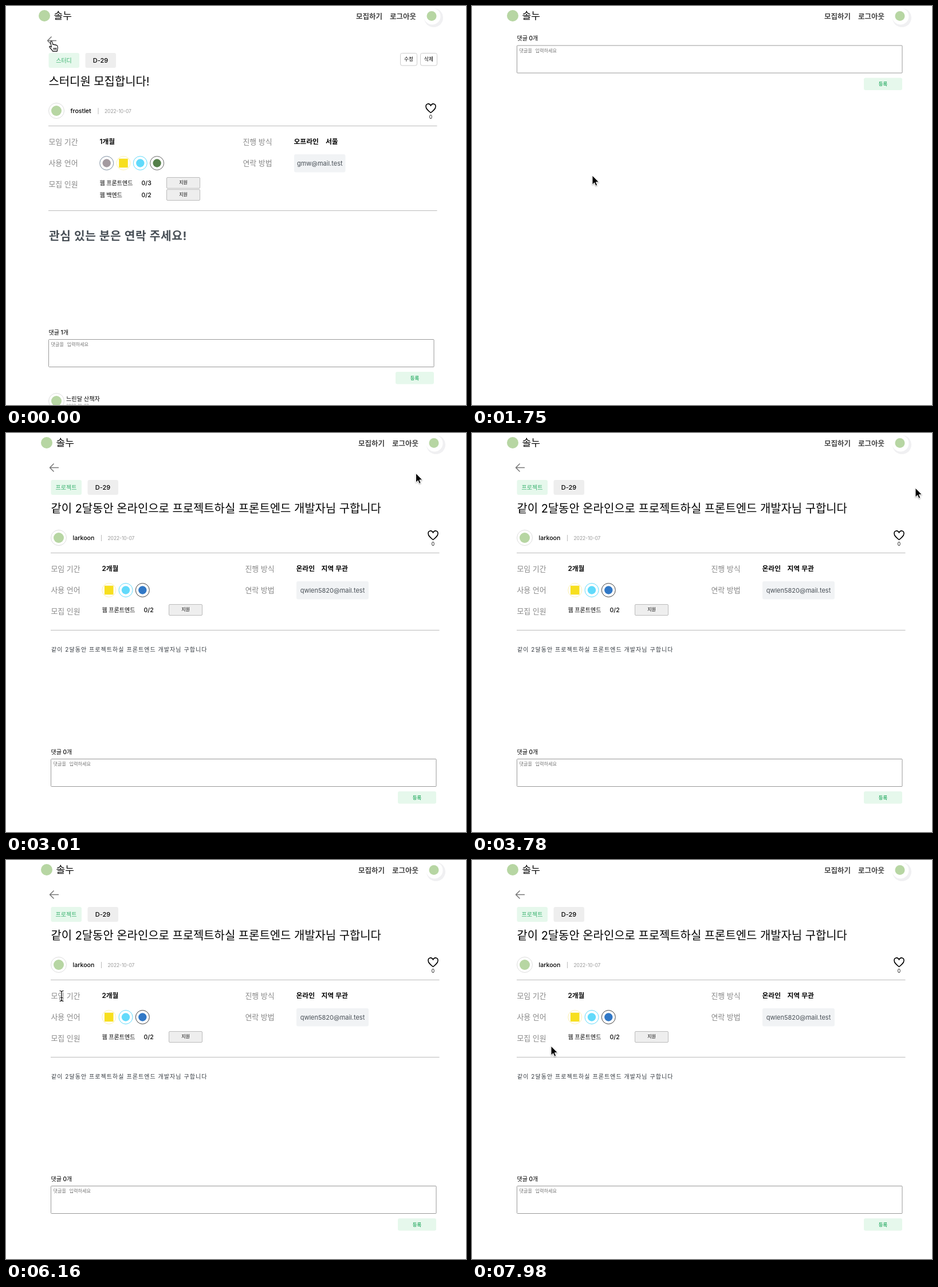
An HTML page for the animation above (8000 ms loop, 803 by 697 pixels).

```html
<!DOCTYPE html>
<html lang="ko">
<head>
<meta charset="utf-8">
<style>
html, body { margin: 0; width: 100%; height: 100%; overflow: hidden; background: #fff; }
svg { display: block; width: 803px; height: 697px; }
text { font-family: Inter, 'Noto Sans CJK KR', 'Noto Sans CJK JP', sans-serif; white-space: pre; }
.soft { filter: drop-shadow(0 1px 3px #0001); }
</style>
</head>
<body>
<svg id="stage" viewBox="0 0 803 697"></svg>
<script>
const GREEN = '#3cb371', MINT = '#e6f8ec', LEAF = '#b7d6a3';

// y is the visual middle of the text line
const text = (x, y, s, size, fill = '#000', weight = 400, anchor = 'start', more = '') =>
  `<text x="${x}" y="${y + size * .37}" font-size="${size}" fill="${fill}" font-weight="${weight}" text-anchor="${anchor}" ${more}>${s}</text>`;
const mid = (x, y, s, size, fill, weight) => text(x, y, s, size, fill, weight, 'middle');
const rect = (x, y, w, h, fill, rx = 0, stroke = 'none', more = '') =>
  `<rect x="${x}" y="${y}" width="${w}" height="${h}" rx="${rx}" fill="${fill}" stroke="${stroke}" ${more}/>`;
const dot = (x, y, r, fill, stroke = 'none') => `<circle cx="${x}" cy="${y}" r="${r}" fill="${fill}" stroke="${stroke}"/>`;
const line = (d, stroke, w = 1) => `<path d="${d}" fill="none" stroke="${stroke}" stroke-width="${w}" stroke-linejoin="round"/>`;
const group = (dx, body, id = '') => `<g ${id && `id="${id}"`} transform="translate(${dx})">${body}</g>`;
const heart = (x, y, k, stroke, w) =>
  `<path transform="translate(${x} ${y}) scale(${k})" d="M0 8C-5 4-8.5 1-8.5-3C-8.5-8-2.5-9.500 0-4.500C2.500-9.500 8.500-8 8.500-3C8.500 1 5 4 0 8Z" fill="none" stroke="${stroke}" stroke-width="${w / k}"/>`;

// fill, ring, shape
const kinds = {
  js: ['#f7df1e', '#fbf0b0', 'square'], ts: ['#3178c6', '#444'], react: ['#61dafb', '#61dafb'],
  vue: ['#41b883', '#666'], svelte: ['#ff5a2a', '#ff8a66'], next: ['#000', '#222'], java: ['#a39aa0', '#7d8ea0'],
  spring: ['#6db33f', '#8cc46a'], node: ['#55804a', '#666'], nest: ['#e0234e', '#ee8899'], go: ['#00add8', '#55bbdd'],
  kotlin: ['#a94fe8', '#777', 'square'], express: ['#555', '#333'], mysql: ['#4a7fa5', '#557'],
  mongo: ['#4faa41', '#777'], python: ['#3776ab', '#777'], php: ['#777bb4', '#777'], graphql: ['#e10098', '#666'],
  flutter: ['#45c0f5', '#45c0f5'], swift: ['#f05138', '#f7c9b0', 'square'], native: ['#61dafb', '#9ee8fc'],
  unity: ['#222', '#222'], aws: ['#3a4454', '#333'], docker: ['#2496ed', '#7cc4f5']
};
const icon = (x, y, r, name) => {
  const [fill, ring, shape] = kinds[name], side = r * 1.3;
  return dot(x, y, r, '#fff', ring) +
    (shape ? rect(x - side / 2, y - side / 2, side, side, fill) : dot(x, y, r * .6, fill));
};

const header = () => dot(67, 17, 10, LEAF) + text(83.500, 17, '솔누', 17) +
  text(611, 18, '모집하기', 12.5, '#444', 600) + text(670, 18, '로그아웃', 12.5, '#444', 600) +
  dot(746.5, 20.5, 16.5, '#f0f0f2') + dot(744, 18, 14.5, '#fff') + dot(743, 17.5, 8.5, LEAF);

const comments = (y, n) => text(74.5, y, `댓글 ${n}개`, 10, '#000', 500) +
  rect(74.5, y + 12.5, 672.5, 48, '#fff', 1, '#999') +
  text(78.5, y + 21, '댓글을 입력하세요', 8.2, '#777', 400, 'start', 'word-spacing="3"') +
  rect(680, y + 69, 67, 21.5, MINT, 3) + mid(713.5, y + 79.5, '등록', 8.3, GREEN, 600);

const detail = p => line('M88 60.500H73M79.500 53.500L72.500 60.500L79.500 67.500', '#777', 1.5) +
  rect(74.5, 82, 53.5, 26, MINT, 3) + mid(101, 95, p.tag, 10, GREEN, 500) +
  rect(138.5, 82, 53.5, 26, '#eee', 3) + mid(165, 95, 'D-29', 11, '#000', 500) +
  text(74.5, 131.5, p.title, 19.9) +
  dot(88, 183, 13.5, '#fff', '#ddd') + dot(88, 183, 9, LEAF) +
  text(112.5, 183.5, p.name, 10.6, '#000', 500) + line(`M${p.bar} 178V189`, '#bbb') +
  text(p.bar + 11, 183.5, '2022-10-07', 8.4, '#999') +
  heart(741.5, 178.5, 1, '#000', 1.6) + mid(741.5, 194, '0', 8.5) +
  line('M74 209.500H752.500', '#bbb') +
  ['모임 기간', '사용 언어', '모집 인원'].map((s, i) => text(74.5, 237 + 37.300 * i, s, 12.9, '#888')).join('') +
  text(163.5, 237, p.span, 11.7, '#000', 600) +
  text(413.5, 237, '진행 방식', 12.9, '#888') + text(413.5, 274.5, '연락 방법', 12.9, '#888') +
  text(502.5, 237, p.mode, 11.8, '#000', 600) + text(p.placeX, 237, p.place, 11.8, '#000', 600) +
  rect(503, 259, p.mailW, 31.5, '#f1f3f5', 3) + mid(503 + p.mailW / 2, 274.5, p.mail, 11, '#495057') +
  p.icons.map((n, i) => icon(175.7 + 29.3 * i, 274.5, 12, n)).join('') +
  p.roles.map(([role, n], i) => {
    const y = 309 + 21 * i;
    return text(163.5, y, role, 10, '#000', 500) + text(236.5, y, n, 10.5, '#000', 500) +
      rect(280.5, y - 9.5, 58, 19, '#eee', 1.5, '#bbb') + mid(309.5, y - .5, '지원', 8, '#000', 500);
  }).join('') +
  line(`M74 ${p.end}H752.500`, '#bbb') + p.body;

const small = (x, s) => rect(x, 688, 29.500, 22, '#fff', 3, '#ccc');
const button = (x, s) => rect(x, 82.5, 29, 21.5, '#fff', 3, '#ccc') + mid(x + 14.5, 93, s, 8.6, '#000', 500);

const first = header() + detail({
  tag: '스터디', title: '스터디원 모집합니다!', name: 'frostlet', bar: 161, span: '1개월', mode: '오프라인',
  place: '서울', placeX: 558, mail: 'gmw@mail.test', mailW: 89.5, icons: ['java', 'js', 'react', 'node'],
  roles: [['웹 프론트엔드', '0/3'], ['웹 백엔드', '0/2']], end: 357.5,
  body: text(75, 401, '관심 있는 분은 연락 주세요!', 20.3, '#495057', 700, 'start', 'letter-spacing=".6"')
}) + button(688.5, '수정') + button(723.5, '삭제') + comments(570, 1) +
  dot(88, 690, 13.5, '#fff', '#ddd') + dot(88, 690, 9, LEAF) +
  text(105, 686.5, '느린달 산책자', 10.2, '#000', 500) + text(105, 698, '2022-10-07', 7, '#999');

const second = detail({
  tag: '프로젝트', title: '같이 2달동안 온라인으로 프로젝트하실 프론트엔드 개발자님 구합니다', name: 'larkoon', bar: 162.5,
  span: '2개월', mode: '온라인', place: '지역 무관', placeX: 546.5, mail: 'qwlen5820@mail.test', mailW: 126,
  icons: ['js', 'react', 'ts'], roles: [['웹 프론트엔드', '0/2']], end: 344.5,
  body: text(75, 378, '같이 2달동안 프로젝트하실 프론트엔드 개발자님 구합니다', 10, '#343a40', 400, 'start', 'letter-spacing="1.05"')
}) + comments(557, 0);

const eye = x => `<ellipse cx="${x}" cy="200.500" rx="6.300" ry="4.300" fill="none" stroke="#555"/>` + line(`M${x - 2} 200.500a2 2 0 1 0 4 0a2 2 0 1 0-4 0`, '#555');
const bubble = x => `<ellipse cx="${x}" cy="200" rx="6" ry="4.600" fill="#555"/><path d="M${x - 4} 202v5l4-3z" fill="#555"/>` +
  [-2.5, 0, 2.5].map(d => dot(x + d, 200, .7, '#fff')).join('');
const card = ([place, span, title, icons, count, name, views, notes, likes, date = '2022-10-07'], i) => {
  const pill = (x, s, fill, ink) => rect(x, 19, 40, 16, fill, 8) + mid(x + 20, 27, s, 7.6, ink, 700);
  const wide = views > 9;
  const stat = (x, s) => text(x, 201, s, 9, '#000', 500);
  return `<g transform="translate(${75 + 230.7 * (i % 3)} ${218 + 246.500 * (i / 3 | 0)})">` +
    rect(0, 0, 211, 226, '#fff', 16, '#f2f2f2', 'class="soft"') +
    pill(12, place, '#66cc73', '#fff') + pill(58, span, '#66cc73', '#fff') + pill(154, 'D - 29', '#d9d9d9', '#000') +
    title.split('|').map((s, k) => text(15, 63.500 + 14.300 * k, s, 10.7, '#000', 500)).join('') +
    icons.split(' ').map((n, k) => icon(29.2 + 26 * k, 121, 12, n)).join('') +
    text(15, 159, `모집인원 ${count}`, 8.1, '#000', 500) + line('M73 156.500h6l-3 5z', '#000') +
    text(181, 159.500, date, 8.4, '#aaa', 400, 'end') + line('M12 176.500H195', '#eee') +
    dot(25, 200.5, 10, '#ffa500') + mid(25, 200.5, name[0], 9, '#fff', 500) + text(42, 200.500, name, 10.5, '#000', 500) +
    eye(wide ? 122 : 124.5) + stat(wide ? 130 : 133.5, views) + bubble(152) + stat(161, notes) +
    heart(177, 201, .64, '#444', 1) + stat(186, likes) + '</g>';
};
const cards = [
  ['지역무관', '2개월', '같이 2달동안 온라인으로 프로젝트하실|프론트엔드 개발자님 구합니다', 'js react ts', '0 / 2', 'larkoon', 9, 0, 0],
  ['서울', '1개월', '스터디원 모집합니다!', 'java js react node', '0 / 5', 'frostlet', 22, 1, 0],
  ['지역무관', '1개월', '프로젝트겸 스터디 같이하실 분!', 'java vue java', '1 / 5', '하늘하늘마당', 17, 1, 0],
  ['지역무관', '1개월', '자바와 리엑트 그리고 넥스트 같이 공부|하실분 모집해요!', 'java react next', '2 / 5', '고래가좋아요', 16, 2, 1],
  ['지역무관', '3개월', 'ㅂㅈㄷㅂㅈㄷㅂㅈ', 'js node express', '2 / 6', '도도도', 14, 0, 0],
  ['경기', '3개월', 'ㅁㅁ', 'js react java', '1 / 6', '두루두루', 69, 1, 2, '2022-10-06']
];
const filters = Object.keys(kinds).map((name, i) => {
  const x = 110 + 45.4 * (i % 14), y = i < 14 ? 115 : 160.5;
  return `<g class="filter" data-x="${x}" data-y="${y}">${icon(x, y, 18.3, name)}</g>`;
}).join('');
const list = header() +
  text(145, 18, '전체', 12.5, '#000', 700) + text(181.5, 18, '스터디', 12.4, '#aaa', 500) + text(229.5, 18, '프로젝트', 12.4, '#aaa', 500) +
  [[87, '전체', '#000'], [128, '프론트엔드', '#aaa'], [210.5, '백엔드', '#aaa'], [265.5, '기타', '#aaa']]
    .map(([x, s, c]) => text(x, 68, s, 15, c, 600)).join('') + filters +
  text(651, 195, '모집중', 12.6, '#000', 600) + rect(690.5, 186, 33.5, 19, '#4fb477', 9.5) + dot(699.5, 195.5, 8, '#fff') +
  rect(-20, 179, 85, 194, '#fff', 14, '#f0f0f0', 'class="soft"') +
  dot(39, 219.5, 5.8, 'none', '#333') + mid(39, 219.5, '?', 8.5, '#333', 500) +
  [16, 8, 7, 2, 1].map((n, i) => text(45, 264 + 20 * i, n, 11, '#000', 500, 'end')).join('') +
  cards.map(card).join('');

const cursors =
  `<path id="hand" d="M.2 9L-1.200 2.500Q-1.500.200 0 0Q1.400-.100 1.800 1.900L2.900 6Q4.800 5 5.600 6.400Q7.400 5.600 8.200 7Q10 6.600 10.800 8.400Q11.800 11.400 10.800 13.800L10.200 17.600H2.600Q1.600 15.400-.800 13Q-3.400 10.400-3.200 9.400Q-2.200 8 .2 10.500ZM4.300 11.500V15M6.400 11.500V15M8.400 11.500V15" fill="#fff" stroke="#000" stroke-width="1.100" stroke-linejoin="round"/>` +
  `<path id="arrow" d="M0 0V16.200L3.700 12.700L6 18.200L8.700 17.100L6.400 11.700H11.500Z" fill="#000" stroke="#fff" style="filter:drop-shadow(0 1px 1px #0005)"/>` +
  `<g id="beam">` + ['#fff', '#000'].map((c, i) => line('M-3.500-9Q0-9 0-7V7Q0 9-3.500 9M3.500-9Q0-9 0-7M0 7Q0 9 3.500 9M-2 3H2', c, i ? 1.2 : 3)).join('') + '</g>';

const stage = document.getElementById('stage');
stage.innerHTML = group(0, first, 'first') + group(0, list, 'list') +
  group(4, header() + comments(56.5, 0), 'loading') + group(4, header() + second, 'second') +
  `<g id="cursor">${cursors}</g>`;
const $ = id => document.getElementById(id);
const pick = (ids, on) => ids.forEach(id => $(id).style.display = id === on ? '' : 'none');

// time, x, y of the pointer
const path = [
  [0, 79, 61.5], [70, 77, 60], [140, 75, 59.5], [560, 75, 59.5], [630, 74.5, 58], [700, 74.5, 58], [770, 75, 58], [840, 75, 58],
  [1050, 249, 129.5], [1190, 236, 205], [1330, 218, 268], [1540, 210, 296], [1820, 210, 296],
  [2170, 296, 235], [2520, 502, 116], [2940, 690, 72], [3220, 792, 65], [3360, 798, 82],
  [3780, 774, 96], [4200, 574, 175], [4550, 390, 280], [4900, 256, 338], [4970, 256, 338], [5040, 255, 338], [5110, 255, 338],
  [5250, 262, 342], [5460, 262, 342], [5880, 160, 280], [6160, 97, 237.5], [6300, 91, 237], [6370, 91, 237],
  [6790, 290, 235], [7210, 563, 206], [7350, 625, 225], [7560, 470, 300], [7770, 230, 345], [7980, 138, 325]
];
const locate = t => {
  const i = path.findIndex(p => p[0] >= t), b = path[i], a = path[Math.max(0, i - 1)];
  const k = b[0] > a[0] ? (t - a[0]) / (b[0] - a[0]) : 0;
  return [a[1] + (b[1] - a[1]) * k, a[2] + (b[2] - a[2]) * k];
};

function draw(now) {
  const t = Math.floor(now % 8000 / 70) * 70;
  const [x, y] = locate(t);
  pick(['first', 'list', 'loading', 'second'], t < 910 ? 'first' : t < 1750 ? 'list' : t < 1820 ? 'loading' : 'second');
  pick(['hand', 'arrow', 'beam'], t < 1750 ? 'hand' : t >= 6090 && t < 6440 ? 'beam' : 'arrow');
  $('cursor').setAttribute('transform', `translate(${x} ${y})`);
  for (const f of document.querySelectorAll('.filter'))
    f.style.opacity = Math.hypot(f.dataset.x - x, f.dataset.y - y) < 19 ? 1 : .5;
  requestAnimationFrame(draw);
}
requestAnimationFrame(draw);
</script>
</body>
</html>
```
